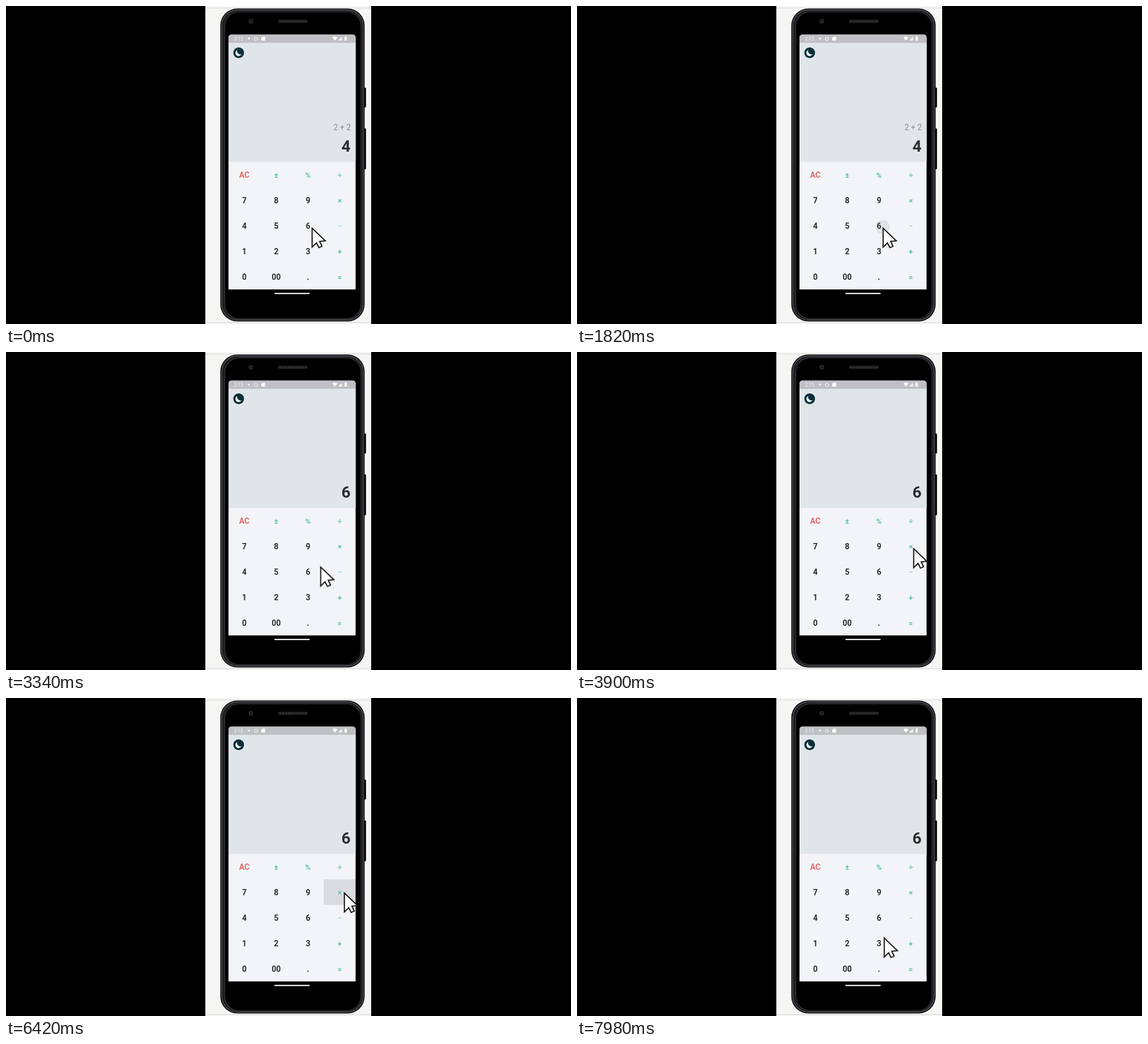
These frames come from a looping animation (998 px wide and 561 px high, 8000 ms). An HTML page:

```html
<!DOCTYPE html>
<html lang="en">
<head>
<meta charset="utf-8">
<title>Calculator</title>
<style>
  html, body { margin: 0; width: 100%; height: 100%; overflow: hidden; background: #000; }
  svg { display: block; width: 100vw; height: 100vh; font-family: Roboto, sans-serif; }
  .key { font-size: 14px; font-weight: 700; text-anchor: middle; fill: #2b2c32; }
  .op { fill: #4fc1b3; font-size: 13px; }
  .clear { fill: #e2696b; }
  .big { font-size: 28px; font-weight: 700; text-anchor: end; fill: #2c2d34; }
  .small { font-size: 14px; text-anchor: end; fill: #858a94; }
  .ripple circle { transform-box: fill-box; transform-origin: center; }
</style>
</head>
<body>
<svg viewBox="0 0 998 561">
  <defs>
    <clipPath id="screen"><path d="M393 500V56q0-5.500 5.500-5.500h213.500q5.500 0 5.500 5.500V500z"/></clipPath>
    <clipPath id="cellSix"><rect x="505" y="365" width="56" height="45"/></clipPath>
    <clipPath id="cellTimes"><rect x="561.5" y="320" width="56" height="45"/></clipPath>
  </defs>

  <rect width="998" height="561"/>
  <rect x="352" width="293" height="561" fill="#f5f5f3"/>
  <path d="M352 3.5H645M352 558.5H645" stroke="#d5d5dc"/>
  <path d="M352.5 0V561" stroke="#dcdce0"/>

  <!-- phone body -->
  <path d="M632 144h3q1 0 1 2v31q0 2-1 2h-3zM632 216h3q1 0 1 2v68q0 2-1 2h-3z" fill="#111114"/>
  <rect x="378.5" y="4.5" width="255" height="552" rx="30" fill="#0c0c0e"/>
  <rect x="381" y="7" width="250" height="547" rx="28" fill="#1d1d20" stroke="#48484d" stroke-width="1.800"/>
  <rect x="386.5" y="10.500" width="240.500" height="541" rx="25" fill="#000" stroke="#36363b" stroke-width="1.200"/>
  <circle cx="432.5" cy="27" r="4" fill="#29292c"/>
  <circle cx="432.5" cy="27" r="1.8" fill="#111"/>
  <rect x="480" y="24" width="53" height="6" rx="3" fill="#1c1c1e"/>
  <path d="M483 27H531" stroke="#333336" stroke-width="3" stroke-dasharray="3 2"/>

  <g clip-path="url(#screen)">
    <rect x="393" y="50" width="225" height="450" fill="#f2f4f8"/>
    <rect x="393" y="65" width="225" height="210" fill="#e0e5e9"/>
    <rect x="393" y="50" width="225" height="15" fill="#bfc0c3"/>
  </g>

  <!-- status bar -->
  <g fill="#fff">
    <text x="402.5" y="60.5" font-size="8.5" fill="#f4f4f5">2:15</text>
    <circle cx="429" cy="57.5" r="2" opacity=".75"/>
    <circle cx="441.5" cy="58" r="2.8" fill="none" stroke="#fff"/>
    <path d="M451 56l2-2h4.5v7H451z"/>
    <path d="M576.5 55.5q4.500-3.500 9 0L581 61z"/>
    <path d="M587 61l6.500-7v7z" opacity=".85"/>
    <path d="M598 54.500h1v-1h2v1h1V61h-4z"/>
  </g>

  <!-- theme switch -->
  <circle cx="411" cy="82.500" r="9.500" fill="#0a2f38"/>
  <path d="M408.500 77.500a5.700 5.700 0 1 0 7.500 7.600a6 6 0 0 1-7.500-7.600z" fill="#e9f3f3"/>

  <g id="before">
    <text class="small" x="609" y="219.300">2 + 2</text>
    <text class="big" x="608.500" y="256.500">4</text>
  </g>
  <text id="after" class="big" x="608.500" y="256.500" opacity="0">6</text>

  <g id="six" class="ripple" clip-path="url(#cellSix)" opacity="0">
    <circle cx="540" cy="390" r="48" opacity=".09"/>
  </g>
  <g id="times" class="ripple" clip-path="url(#cellTimes)" opacity="0">
    <circle cx="596" cy="341" r="48" opacity=".1"/>
  </g>

  <g id="keys"></g>
  <rect x="474" y="506" width="62.500" height="2.200" rx="1.100" fill="#eee"/>

  <path id="cursor" d="M.7 1V34.500L8.400 27 12.700 35.300 18.200 32.800 14 24.300 24 23.300z"
    fill="#fff" stroke="#111" stroke-width="2"/>
</svg>
<script>
  const LOOP = 8000;
  const $ = selector => document.querySelector(selector);

  const rows = [
    ['AC', '±', '%', '÷'],
    ['7', '8', '9', '×'],
    ['4', '5', '6', '−'],
    ['1', '2', '3', '+'],
    ['0', '00', '.', '=']
  ];
  rows.forEach((row, r) => row.forEach((label, c) => {
    const key = document.createElementNS('http://www.w3.org/2000/svg', 'text');
    const isOp = c === 3 || (r === 0 && c > 0);
    key.setAttribute('class', 'key' + (label === 'AC' ? ' clear' : isOp ? ' op' : ''));
    key.setAttribute('x', 421 + c * 56.2);
    key.setAttribute('y', 303 + r * 45.1);
    if (label === '−') key.setAttribute('opacity', .65);
    key.textContent = label;
    $('#keys').append(key);
  }));

  // Each step is [time in ms, value, easing towards the next step].
  function play(selector, property, steps) {
    const frames = steps.map(([time, value, easing = 'linear']) =>
      ({ offset: time / LOOP, [property]: value, easing }));
    $(selector).animate(frames, { duration: LOOP, iterations: Infinity });
  }

  function swap(selector, time, from, to) {
    play(selector, 'opacity', [[0, from], [time, from], [time, to], [LOOP, to]]);
  }

  function press(selector, start, release) {
    play(selector, 'opacity', [
      [0, 0], [start, 0], [start + 80, 1], [release, 1], [release + 350, 0], [LOOP, 0]
    ]);
    play(selector + ' circle', 'transform', [
      [0, 'scale(.1)'], [start, 'scale(.1)'],
      [start + 450, 'scale(1.3)'], [LOOP, 'scale(1.3)']
    ]);
  }

  const at = (x, y) => `translate(${x}px, ${y}px)`;

  swap('#before', 2440, 1, 0);
  swap('#after', 2440, 0, 1);
  press('#six', 1760, 2740);
  press('#times', 5400, 6440);
  play('#cursor', 'transform', [
    [0, at(540, 391)], [3040, at(540, 391), 'ease-in-out'],
    [3860, at(594, 346)], [4300, at(594, 346), 'ease-in-out'],
    [4700, at(597, 343)], [6800, at(597, 343), 'ease-in-out'],
    [7900, at(542, 422.5)], [LOOP, at(542, 422.5)]
  ]);
</script>
</body>
</html>
```
